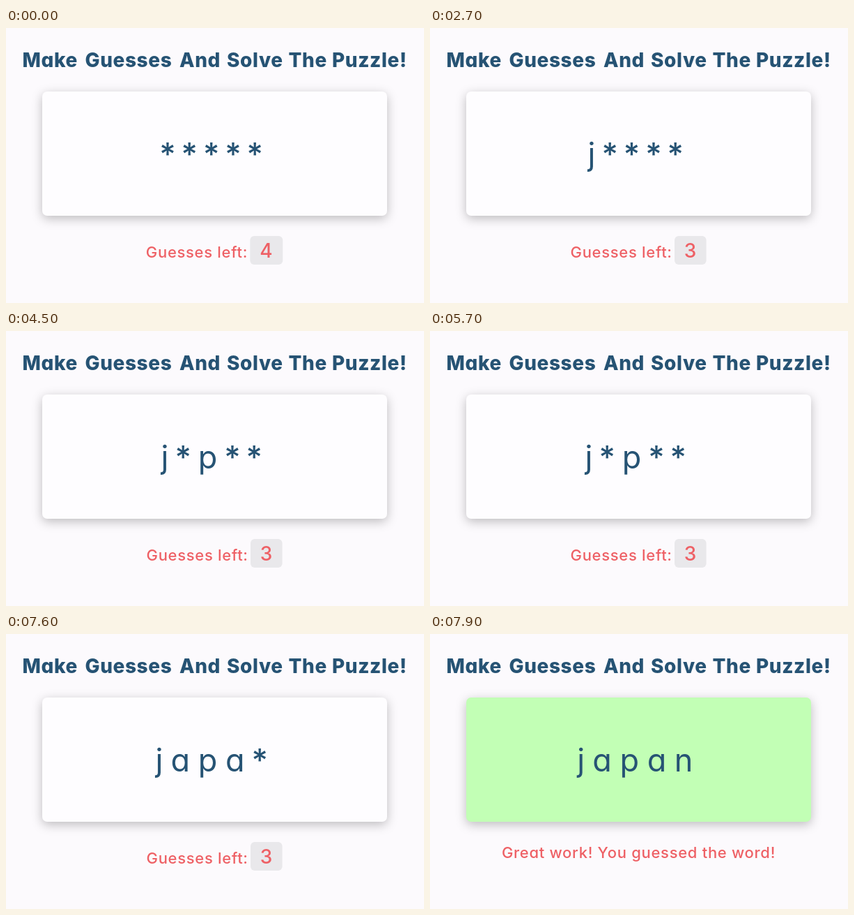
Write an HTML page that moves like this. It is 600x394 px and loops after 8000 ms.

```html
<!DOCTYPE html>
<html lang="en">
<head>
<meta charset="utf-8">
<title>Guess the word</title>
<style>
html, body {
  margin: 0;
  width: 100%;
  height: 100%;
  overflow: hidden;
  background: #fcfafd;
}
#stage {
  position: relative;
  width: 600px;
  height: 394px;
}
#card {
  position: absolute;
  left: 52px;
  top: 91px;
  width: 495px;
  height: 177.5px;
  border-radius: 7px;
  background: #fefdff;
  box-shadow: 0 4px 15px rgba(0, 0, 0, .25);
}
.won #card { background: #c2ffb5; }
svg {
  position: absolute;
  left: 0;
  top: 0;
  font-family: Inter, "Open Sans", sans-serif;
  font-feature-settings: "cv11";
}
.title { font-size: 28px; font-weight: 800; letter-spacing: .6px; fill: #265374; }
#word { font-size: 45px; text-anchor: middle; fill: #265374; }
#word .star { font-weight: 500; }
.hint { font-size: 22px; font-weight: 500; letter-spacing: .7px; fill: #ee6065; }
#digit { font-size: 28px; font-weight: 500; text-anchor: middle; fill: #ee6065; }
#win { display: none; text-anchor: middle; }
.won #win { display: inline; }
.won #left { display: none; }
</style>
</head>
<body>
<div id="stage">
  <div id="card"></div>
  <svg width="600" height="394" viewBox="0 0 600 394">
    <text class="title" y="56">
      <tspan x="23.5">Make</tspan>
      <tspan x="113.5">Guesses</tspan>
      <tspan x="249">And</tspan>
      <tspan x="317">Solve</tspan>
      <tspan x="405.5">The</tspan>
      <tspan x="468">Puzzle!</tspan>
    </text>
    <g id="word"></g>
    <g id="left">
      <text id="label" class="hint" y="329">Guesses left:</text>
      <rect id="pill" y="298" height="41" rx="6" fill="#e9e8eb"/>
      <text id="digit" x="373.5" y="329"></text>
    </g>
    <text id="win" class="hint" x="299.5" y="321">Great work! You guessed the word!</text>
  </svg>
</div>
<script>
const LOOP = 8000;
const STEPS = [
  { at: 0, word: "*****", left: 4 },
  { at: 1000, word: "j****", left: 4 },
  { at: 2600, word: "j****", left: 3 },
  { at: 4400, word: "j*p**", left: 3 },
  { at: 6000, word: "japa*", left: 3 },
  { at: 7700, word: "japan", left: 0 }
];
// Letter advances, tracking included
const ADVANCE = { "*": 31.3, j: 21.2, a: 39.3, p: 39.3, n: 37.9 };
const TRACKING = 10.8;
const BASELINE = 197;

const el = id => document.getElementById(id);

function drawWord(word) {
  const letters = [...word];
  const total = letters.reduce((sum, c) => sum + ADVANCE[c], 0);
  let x = 300 - total / 2;
  el("word").replaceChildren(...letters.map(c => {
    const t = document.createElementNS("http://www.w3.org/2000/svg", "text");
    t.setAttribute("x", x + (ADVANCE[c] - TRACKING) / 2);
    t.setAttribute("y", BASELINE);
    if (c === "*") t.setAttribute("class", "star");
    t.textContent = c;
    x += ADVANCE[c];
    return t;
  }));
}

function show({ word, left }) {
  const shift = left === 4 ? 0 : .7;
  drawWord(word);
  el("label").setAttribute("x", 200.8 + shift);
  el("pill").setAttribute("x", 350.3 + shift);
  el("pill").setAttribute("width", 47 - 2 * shift);
  el("digit").textContent = left;
  el("stage").classList.toggle("won", !word.includes("*"));
}

let current;
const start = performance.now();

function tick() {
  const time = (performance.now() - start) % LOOP;
  const step = STEPS.findLast(s => s.at <= time);
  if (step !== current) show(current = step);
  requestAnimationFrame(tick);
}
tick();
</script>
</body>
</html>
```
